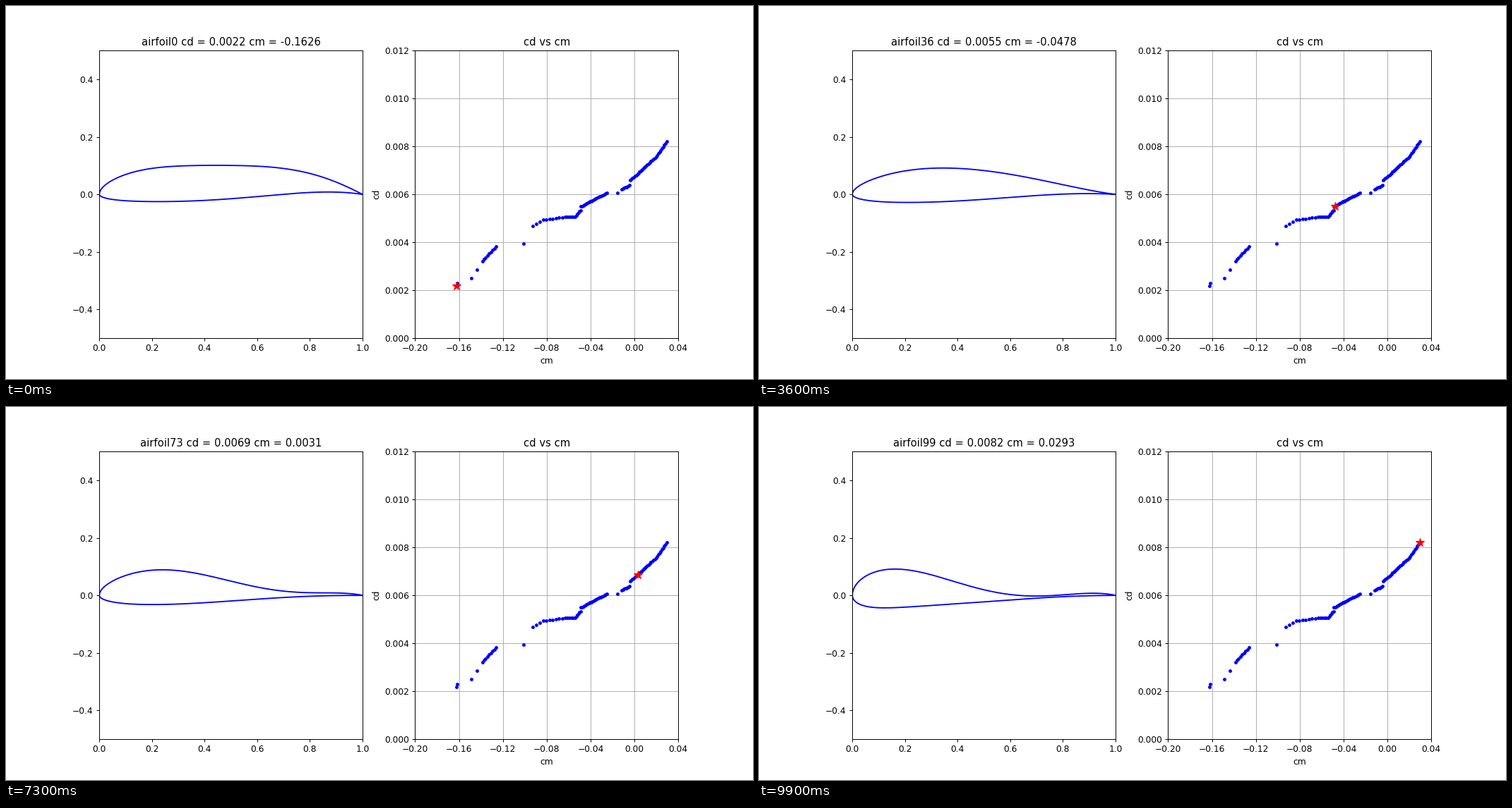
A matplotlib script for the animation above (10000 ms loop, 1058x529 px).

```python
import numpy as np
import matplotlib.pyplot as plt
from matplotlib.animation import FuncAnimation

N = 100

# Bends of the Pareto front: (design, cm * 1e4, cd * 1e5), straight in between
BENDS = np.array([
    (0, -1626, 217), (1, -1620, 229), (2, -1485, 251), (4, -1388, 322),
    (12, -1261, 381), (13, -1012, 394), (14, -925, 469), (17, -832, 493),
    (24, -632, 506), (29, -540, 507), (34, -491, 534), (35, -488, 549),
    (47, -363, 580), (57, -251, 606), (58, -156, 606), (59, -114, 621),
    (66, -44, 639), (67, -42, 658), (73, 31, 686), (82, 105, 719),
    (90, 196, 756), (99, 293, 820),
])
design, cm_bend, cd_bend = BENDS.T
cm = np.interp(range(N), design, cm_bend) * 1e-4
cd = np.interp(range(N), design, cd_bend) * 1e-5

# Airfoil as y = sqrt(x) (1 - x) S(x), S a quartic.
# Per key design: S * 1000 at x = 0, 1/4, 1/2, 3/4, 1 for both surfaces
KEYS = {
    0: ((215, 255, 285, 383, 475), (-90, -67, -43, 18, 140)),
    24: ((165, 225, 246, 251, 115), (-95, -76, -50, -1, 75)),
    47: ((190, 240, 226, 163, 110), (-105, -73, -48, -9, 35)),
    62: ((195, 232, 168, 77, 165), (-115, -84, -55, -21, 0)),
    90: ((250, 245, 100, 13, 220), (-115, -84, -56, -26, -5)),
    99: ((320, 220, 55, -5, 200), (-210, -102, -64, -32, -8)),
}
key_cm = cm[list(KEYS)]
key_shapes = np.array(list(KEYS.values())) / 1000
x = (1 - np.cos(np.linspace(0, np.pi, 121))) / 2


def surface(side, i):
    """Blend the key shapes by cm and evaluate one side of design i."""
    s = [np.interp(cm[i], key_cm, col) for col in key_shapes[:, side].T]
    quartic = np.polyfit(np.linspace(0, 1, 5), s, 4)
    return np.sqrt(x) * (1 - x) * np.polyval(quartic, x)


fig, (ax_foil, ax_front) = plt.subplots(1, 2, figsize=(12, 6), dpi=88.1667)

foil, = ax_foil.plot([], [], 'b-')
ax_foil.set_xlim(0, 1)
ax_foil.set_ylim(-0.5, 0.5)
title = ax_foil.set_title('')

ax_front.plot(cm, cd, 'b.')
star, = ax_front.plot([], [], 'r*', markersize=10)
ax_front.set_xlim(-0.2, 0.04)
ax_front.set_ylim(0, 0.012)
ax_front.set_xticks(np.linspace(-0.2, 0.04, 7))
ax_front.set_xlabel('cm')
ax_front.set_ylabel('cd')
ax_front.set_title('cd vs cm')
ax_front.grid(True)


def update(i):
    upper, lower = surface(0, i), surface(1, i)
    foil.set_data(np.r_[x[::-1], x[1:]], np.r_[upper[::-1], lower[1:]])
    star.set_data([cm[i]], [cd[i]])
    title.set_text(f'airfoil{i} cd = {cd[i]:.4f} cm = {cm[i]:.4f}')
    return foil, star, title


anim = FuncAnimation(fig, update, frames=N, interval=100, repeat=True)
plt.show()
```
